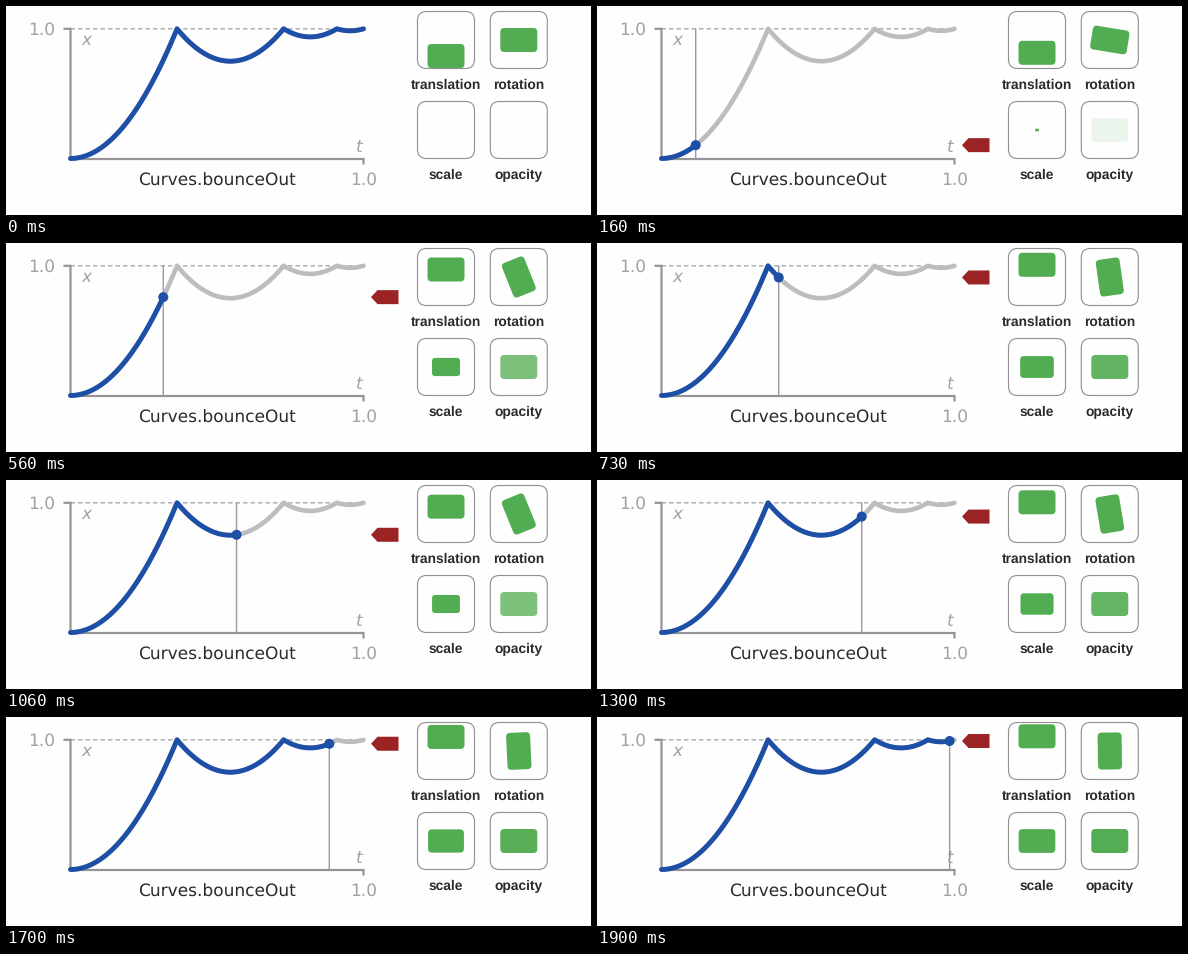
These frames come from a looping animation (585x209 px, 1930 ms). A matplotlib script:

```python
import numpy as np
import matplotlib.pyplot as plt
from matplotlib.animation import FuncAnimation
from matplotlib.patches import Circle, FancyBboxPatch, Polygon
from matplotlib.transforms import Affine2D

W, H, DPI = 585, 209, 64
PT = 72 / DPI  # points per pixel
STEP, LOOP = 10, 1930  # ms

BLUE, RED, GREEN = "#1d4fa6", "#9c2323", "#52ad52"
AXIS, PALE, LABEL, INK = "#949497", "#bdbcbe", "#a2a2a6", "#2a2a2e"

X0, X1, Y0, Y1 = 64.5, 357.5, 152.5, 22.8
LEFT, RIGHT, TOP, BOTTOM = 440, 512.8, 34, 124

plt.rcParams["text.hinting"] = "none"


def bounce_out(t):
    t = np.asarray(t, float)
    shift = np.select([t < 1 / 2.75, t < 2 / 2.75, t < 2.5 / 2.75],
                      [0, 1.5 / 2.75, 2.25 / 2.75], 2.625 / 2.75)
    base = np.select([t < 1 / 2.75, t < 2 / 2.75, t < 2.5 / 2.75],
                     [0, 0.75, 0.9375], 0.984375)
    return 7.5625 * (t - shift) ** 2 + base


def px(t):
    return X0 + (X1 - X0) * t


def py(v):
    return Y0 + (Y1 - Y0) * v


def curve(end):
    peaks = np.array([1, 2, 2.5]) / 2.75
    t = np.sort(np.append(np.linspace(0, end, 160), peaks[peaks < end]))
    return px(t), py(bounce_out(t))


fig = plt.figure(figsize=(W / DPI, H / DPI), dpi=DPI, facecolor="#fefefe")
ax = fig.add_axes([0, 0, 1, 1])
ax.set(xlim=(0, W), ylim=(H, 0))
ax.axis("off")


def line(x, y, color, width, **kw):
    kw.setdefault("solid_capstyle", "round")
    return ax.plot(x, y, color=color, lw=width * PT, snap=False, **kw)[0]


def text(x, y, s, color, size=17, **kw):
    kw.setdefault("family", "DejaVu Sans")
    return ax.text(x, y, s, color=color, size=size * PT, va="baseline", **kw)


def rounded(w, h, r, **kw):
    box = f"round,pad=0,rounding_size={r}"
    return FancyBboxPatch((-w / 2, -h / 2), w, h, boxstyle=box,
                          snap=False, **kw)


def place(patch, x, y, scale=1, angle=0):
    move = Affine2D().scale(scale).rotate_deg(angle).translate(x, y)
    patch.set_transform(move + ax.transData)


def card(x, y, name):
    frame = rounded(57, 57, 9, fc="none", ec="#929294", lw=1.15 * PT, zorder=2)
    tile = rounded(37, 24, 4, fc=GREEN, ec="none", zorder=3)
    for patch in (frame, tile):
        place(patch, x, y)
        ax.add_patch(patch)
    text(x, y + 49, name, INK, 13.7, ha="center",
         family="Liberation Sans", weight="bold")
    return tile


# Chart
line([X0, X1], [Y1, Y1], "#b0b0b2", 1.5, dashes=(3, 2), zorder=1)
line([57.5, X0, X0, X1, X1], [Y1, Y1, Y0 + 0.5, Y0 + 0.5, 158.5], AXIS, 2.2,
     solid_capstyle="butt", solid_joinstyle="miter", zorder=2)
text(49.5, 29, "1.0", LABEL, ha="right")
text(357.3, 178.7, "1.0", LABEL, ha="center")
text(75, 39, "x", LABEL, style="italic")
text(350.3, 145.7, "t", LABEL, style="italic")
text(211, 179.3, "Curves.bounceOut", INK, ha="center")

line(*curve(1), PALE, 4.6, zorder=3)
guide = line([X0, X0], [Y0, Y1], "#9a9aa2", 1.4, zorder=4)
trace = line([], [], BLUE, 4.9, zorder=5)
dot = ax.add_patch(Circle((X0, Y0), 5, fc=BLUE, ec="none", zorder=6))
arrow = ax.add_patch(Polygon(
    [(-13.5, 0), (-7, -7), (14, -7), (14, 7), (-7, 7)],
    fc=RED, ec="none", snap=False, zorder=4))

# Cards
slide = card(LEFT, TOP, "translation")
spin = card(RIGHT, TOP, "rotation")
grow = card(LEFT, BOTTOM, "scale")
fade = card(RIGHT, BOTTOM, "opacity")


def update(i):
    tick = (3 * i + 2) // 10  # 30 pictures a second on a 10 ms clock
    if tick == 23:
        tick = 22  # one picture is held twice as long
    running = tick > 0
    t = (tick + 2) / 60 if running else 0
    v = float(bounce_out(t))
    x, y = px(t), py(v)

    trace.set_data(*curve(t if running else 1))
    guide.set_xdata([x, x])
    dot.center = x, y
    place(arrow, 378.5, y)
    for part in (guide, dot, arrow, grow, fade):
        part.set_visible(running)

    place(slide, LEFT, 50 - 31 * v)
    place(spin, RIGHT, TOP, angle=90 * v)
    place(grow, LEFT, BOTTOM, scale=v)
    fade.set_alpha(min(v, 1))
    return ()


anim = FuncAnimation(fig, update, frames=LOOP // STEP, interval=STEP,
                     repeat=True, repeat_delay=0, blit=False)
plt.show()
```
